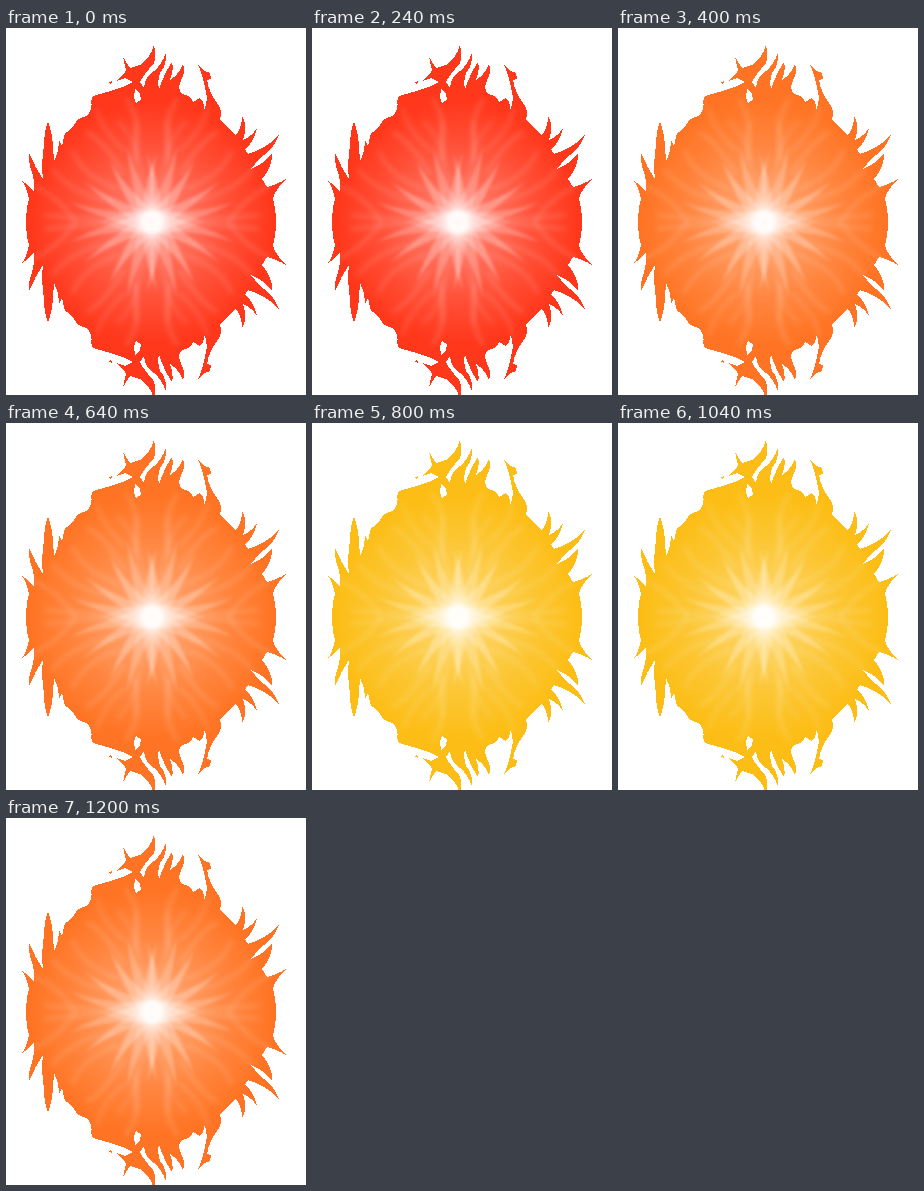
Write an HTML page that moves like this. It is 300 by 367 pixels and loops after 1600 ms.

```html
<!DOCTYPE html>
<html lang="en">
<head>
<meta charset="utf-8">
<title>Fireball</title>
<style>
  html, body { margin: 0; width: 100%; height: 100%; overflow: hidden; background: #fff; }
  svg { display: block; width: 100vw; height: 100vh; }
</style>
</head>
<body>
<svg viewBox="0 0 300 367">
  <defs>
    <radialGradient id="glow" gradientUnits="userSpaceOnUse" cx="146" cy="194" r="122">
      <stop offset="0" stop-color="#fff" stop-opacity=".4"/>
      <stop offset=".3" stop-color="#fff" stop-opacity=".28"/>
      <stop offset=".65" stop-color="#fff" stop-opacity=".12"/>
      <stop offset="1" stop-color="#fff" stop-opacity="0"/>
    </radialGradient>
    <filter id="soft" x="-20%" y="-20%" width="140%" height="140%"><feGaussianBlur stdDeviation="1.5"/></filter>
    <filter id="haze" x="-20%" y="-20%" width="140%" height="140%"><feGaussianBlur stdDeviation="2.4"/></filter>
    <path id="half" fill-rule="evenodd" d="M20 195 Q20 181 23 171 Q21 160 16 153 Q22 156 28 164
      Q29 155 26 144 Q22 134 23 125 Q29 139 37 151 Q35 137 38 117 Q38 104 42 93
      Q46 104 47 118 L48 133 Q53 123 53 112 L56 118 L59 105 Q66 102 71 92 L82 87
      Q87 80 85 73 L87 68 L101 64 L110 61 Q119 59 127 54 L119 50 L110 53 Q118 47 120 42
      L117 29 L124 40 L134 37 Q145 29 148 17 Q151 28 147 37 Q139 44 134 54 L138 60
      Q139 48 148 43 Q156 36 160 25 Q161 37 154 45 Q151 54 153 61 Q158 46 166 34
      Q168 41 164 52 L168 49 Q174 44 177 36 Q180 45 175 52 Q171 62 176 66
      Q184 67 187 74 L194 70 Q199 75 198 82 Q203 71 199 60 Q197 47 192 37
      L198 43 L204 45 L205 51 L201 52 Q203 65 211 75 Q217 82 214 91 L221 99 L230 107
      Q236 99 236 88 Q242 98 237 112 Q246 108 251 100 Q248 114 239 121 L242 126
      Q261 120 273 107 Q268 121 254 130 L245 141 Q258 136 266 125 Q267 138 256 151
      L261 159 Q270 157 280 151 Q273 158 269 165 L267 171 Q270 182 270 195Z
      M129 61 L134 65 L135 72 L130 75 L128 69Z M103 54 L106 53 L106 55 L104 56Z"/>
    <g id="quarter">
      <g id="rays" filter="url(#soft)" fill="#fff"></g>
      <g id="wisps" filter="url(#haze)" fill="none" stroke="#fff" stroke-linecap="round"></g>
    </g>
    <g id="upper">
      <use href="#quarter"/>
      <use href="#quarter" transform="matrix(-1 0 0 1 292 0)"/>
    </g>
  </defs>
  <g id="body" shape-rendering="crispEdges">
    <use href="#half"/>
    <use href="#half" transform="matrix(1 0 0 -1 0 388)"/>
  </g>
  <circle cx="146" cy="194" r="122" fill="url(#glow)"/>
  <use href="#upper"/>
  <use href="#upper" transform="matrix(1 0 0 -1 0 388)"/>
</svg>
<script>
const $ = id => document.getElementById(id);
const add = (parent, attrs) => {
  const el = document.createElementNS('http://www.w3.org/2000/svg', 'path');
  for (const k in attrs) el.setAttribute(k, attrs[k]);
  $(parent).append(el);
};

// Tapered rays from the core: tip x, tip y, bend x, bend y, root width, opacity
[
  [64, 174, 100, 190, 10, .24],
  [78, 153, 106, 177, 9, .28],
  [104, 133, 119, 166, 10, .3],
  [121, 117, 127, 153, 10, .24],
  [151, 125, 139, 160, 10, .28],
  [93, 195, 112, 187, 12, .22]
].forEach(([x, y, bx, by, w, o]) => {
  const len = Math.hypot(146 - bx, 194 - by);
  const nx = (194 - by) / len * w, ny = (bx - 146) / len * w;
  add('rays', {
    d: `M${146 + nx} ${194 + ny}Q${bx + nx / 3} ${by + ny / 3} ${x} ${y}` +
       `Q${bx - nx / 3} ${by - ny / 3} ${146 - nx} ${194 - ny}Z`,
    opacity: o
  });
});

// Faint strands toward the rim
[
  ['M28 158Q52 169 69 193', 4, .13],
  ['M40 187Q62 190 96 192', 4, .13],
  ['M47 142Q66 166 106 173', 4, .12],
  ['M67 124Q77 148 112 161', 4, .13],
  ['M82 105Q99 114 117 145', 4, .14],
  ['M91 82Q96 103 118 122', 4, .11],
  ['M121 72Q136 91 129 131', 4, .14],
  ['M131 95Q126 121 137 154', 3, .13],
  ['M112 94Q128 108 133 137', 3, .12]
].forEach(([d, w, o]) => add('wisps', { d, 'stroke-width': w, opacity: o }));

const tints = ['#ff371b', '#ff7424', '#fcbe16', '#ff7424'];
const start = performance.now();

function draw(t) {
  $('body').setAttribute('fill', tints[Math.floor(t % 1600 / 400)]);
}

function tick() {
  draw(performance.now() - start);
  requestAnimationFrame(tick);
}
tick();
</script>
</body>
</html>
```
